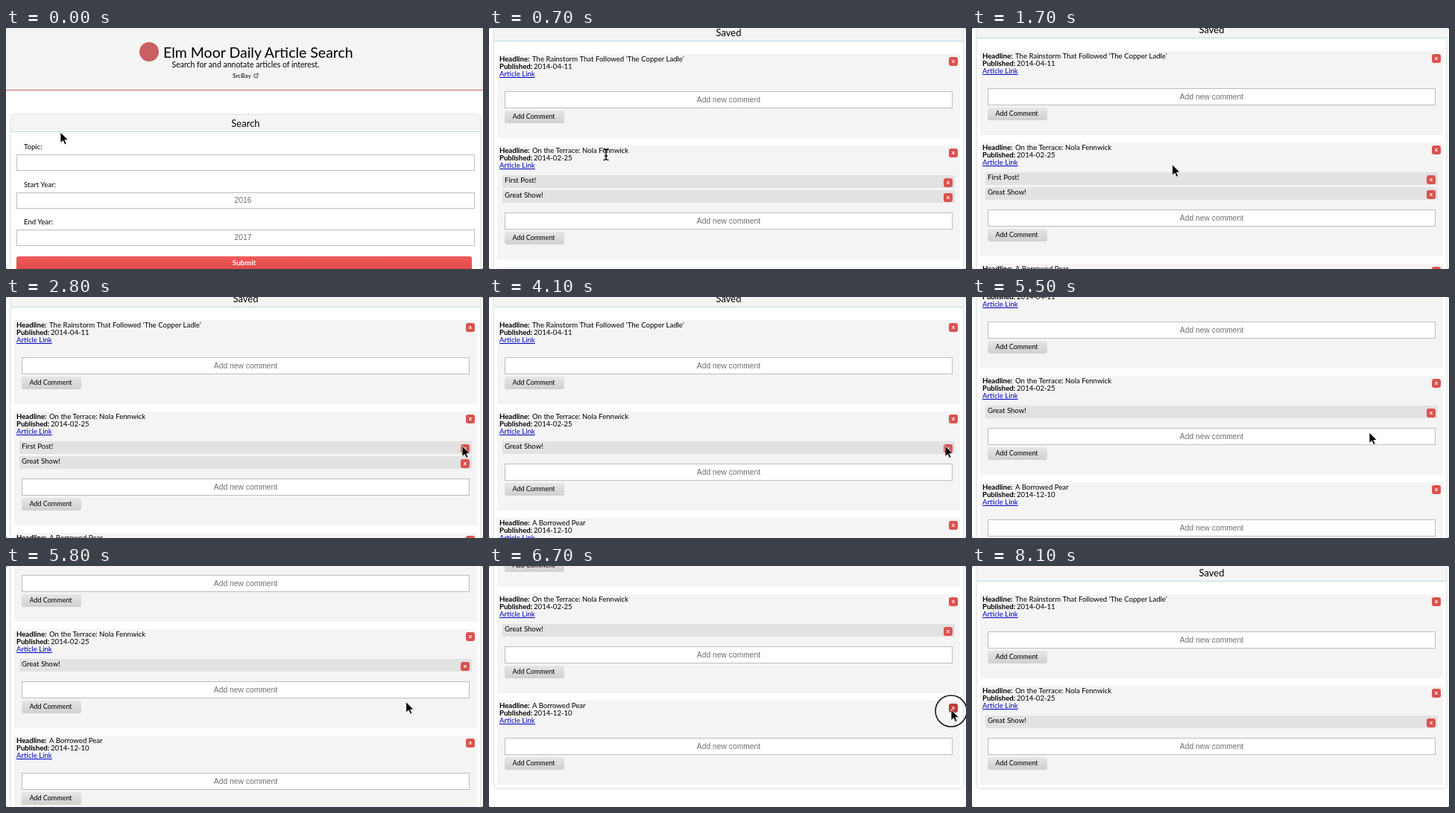
An HTML page that plays this animation: 640x324 px, repeating every 8300 ms.

```html
<!DOCTYPE html>
<html lang="en">
<head>
<meta charset="utf-8">
<title>Article Search</title>
<style>
  * { box-sizing: border-box; }
  html, body { margin: 0; width: 100%; height: 100%; overflow: hidden; background: #666; }
  #stage { position: absolute; inset: 0; overflow: hidden; background: #fff; border-radius: 2px;
    font: 9.6px/10px Lato, "Open Sans", sans-serif; color: #000; }
  #page { position: absolute; left: 0; top: 0; width: 640px; height: 1000px; }
  #page > *, .abs { position: absolute; white-space: nowrap; }

  header { left: 0; top: 0; width: 640px; height: 84px; background: #f4f4f4; border-bottom: 1px solid #cf6666; }
  .badge { left: 179px; top: 19px; width: 26px; height: 26px; border-radius: 50%; background: #c95f60; }
  h1 { margin: 0; left: 211px; top: 21px; font: 19.5px/24px Lato, sans-serif; }
  .lead { left: 0; width: 643px; top: 43px; text-align: center; font-size: 10.5px; line-height: 12px; }
  .repo { left: 304px; top: 59px; font-size: 8.3px; }

  .panel { left: 7px; width: 629px; background: #fff; border-radius: 4px; box-shadow: 0 0 4px rgba(0,0,0,.22); }
  .panel h2 { margin: 0; height: 23px; background: #f4f4f4; border-bottom: 1px solid #b5dfe8;
    border-radius: 4px 4px 0 0; font: 13px/22px Lato, sans-serif; text-align: center; }
  .field { background: #fff; border: 1px solid #bdbdbd; color: #6e6e6e; text-align: center;
    font: 10.3px/21px "Liberation Sans", Arial, sans-serif; height: 23px; }
  .search .field { left: 7px; width: 615px; height: 22px; padding-right: 7px; line-height: 20px; }
  .search label { left: 17px; }
  .submit { left: 7px; top: 190px; width: 611px; height: 19px; border-radius: 3px; color: #fff;
    background: linear-gradient(#f25a5a, #dd4a4a); text-align: center; font: bold 10px/17px Lato, sans-serif; }

  .entry { position: relative; margin: 0 4px 10px; width: 621px; padding: 40px 0 20px; background: #f4f4f4; }
  .entry a { left: 3px; top: 22px; color: #0000c4; text-decoration: underline; }
  .note { position: relative; margin: 0 0 3px 7px; width: 607px; height: 17px; padding-left: 3px;
    background: #e2e2e2; line-height: 14px; }
  .entry .field { margin: 10px 0 3px 10px; width: 601px; }
  .entry .note + .field { margin-top: 13px; }
  .add { margin-left: 10px; width: 80px; height: 17px; padding-right: 2px; border-radius: 3px; text-align: center;
    font-size: 9px; line-height: 16px; background: linear-gradient(#e6e6e6, #d0d0d0); }
  .del { width: 12px; height: 12px; border-radius: 3px; background: #d9534f; color: #fff;
    text-align: center; font: bold 8px/11px "Liberation Sans", Arial, sans-serif; }
  .entry > .del { left: 606px; top: 3.5px; }
  .note > .del { left: 592px; top: 4px; }
  .del.hot { background: #c03a38; }
  svg { position: absolute; left: 0; top: 0; overflow: visible; }
</style>
</head>
<body>
<div id="stage">
  <div id="page">
    <header>
      <div class="abs badge"></div>
      <h1 class="abs">Elm Moor Daily Article Search</h1>
      <div class="abs lead">Search for and annotate articles of interest.</div>
      <div class="abs repo">SrcBay</div>
      <svg width="640" height="84" fill="none" stroke="#333" stroke-width=".8">
        <path d="M335.5 62H333v4.500h4.500V64M335 64.500L338 61.500M336 61.200h2.300v2.300"/>
      </svg>
    </header>
    <section class="panel search" style="top:117px;height:220px">
      <h2>Search</h2>
      <label class="abs" style="top:38px">Topic:</label>
      <div class="abs field" style="top:53px"></div>
      <label class="abs" style="top:89px">Start Year:</label>
      <div class="abs field" style="top:104px">2016</div>
      <label class="abs" style="top:139px">End Year:</label>
      <div class="abs field" style="top:154px">2017</div>
      <div class="abs submit">Submit</div>
    </section>
    <section class="panel" id="saved" style="top:373px;padding-bottom:4px">
      <h2 style="margin-bottom:17px">Saved</h2>
    </section>
  </div>
  <svg width="640" height="324">
    <circle id="ring" r="21" fill="none" stroke="#111" stroke-width="1.5"/>
    <g id="pointer">
      <path id="arrow" d="M0 0V14.500L3.400 11.400L5.800 16.600L8.100 15.600L5.800 10.500H10.300Z" stroke="#fff" stroke-width=".8"/>
      <path id="beam" d="M-3.500 -7.500Q0 -7.500 0 -5Q0 -7.500 3.500 -7.500M0 -5V5.500M-3.500 7.500Q0 7.500 0 5Q0 7.500 3.500 7.500M-2 2H2"
        fill="none" stroke="#000" stroke-width="1.3"/>
    </g>
  </svg>
</div>
<script>
const LOOP = 8300, STEP = 100;
const $ = id => document.getElementById(id);

const articles = [
  ['The Rainstorm That Followed ‘The Copper Ladle’', '2014-04-11', []],
  ['On the Terrace: Nola Fennwick', '2014-02-25', ['First Post!', 'Great Show!']],
  ['A Borrowed Pear', '2014-12-10', []]
];
const del = '<div class="abs del">x</div>';
const line = (top, label, x, text) =>
  `<b class="abs" style="left:3px;top:${top}px">${label}:</b>` +
  `<span class="abs" style="left:${x}px;top:${top}px">${text}</span>`;

articles.forEach(([title, date, notes], i) => {
  const last = i === articles.length - 1;
  $('saved').insertAdjacentHTML('beforeend',
    `<div class="entry"${last ? ' style="margin-bottom:0"' : ''}>` +
    line(2, 'Headline', 47, title) + line(12, 'Published', 49, date) +
    '<a class="abs">Article Link</a>' + del +
    notes.map(n => `<div class="note">${n}${del}</div>`).join('') +
    '<div class="field">Add new comment</div><div class="add">Add Comment</div></div>');
});
const entries = document.querySelectorAll('.entry');
const firstNote = document.querySelector('.note');
const lastEntry = entries[2];
const lastDel = lastEntry.querySelector('.del');

// time, scroll offset
const scroll = [[0, 0], [300, 190], [500, 345], [600, 369], [700, 378], [900, 382],
  [5100, 382], [5300, 412], [5500, 430], [5600, 430], [6000, 472], [6300, 498], [6999, 498], [7000, 375]];
// time, pointer x, pointer y
const path = [[0, 73, 140], [600, 157, 170], [900, 157, 170], [1100, 158, 175], [1400, 158, 175],
  [2300, 585, 208], [2600, 612, 200], [4200, 612, 200], [5100, 533, 182], [5700, 533, 182],
  [6500, 620, 193], [7400, 620, 193], [8100, 575, 340]];

const smooth = p => p * p * (3 - 2 * p);
const linear = p => p;
function at(keys, t, ease) {
  const i = keys.findIndex(k => k[0] > t);
  if (i < 0) return keys[keys.length - 1].slice(1);
  const a = keys[i - 1], b = keys[i];
  const p = ease((t - a[0]) / (b[0] - a[0]));
  return a.slice(1).map((v, j) => v + (b[j + 1] - v) * p);
}
const within = (t, a, b) => t >= a && t < b;
const show = (el, on) => { el.style.display = on ? '' : 'none'; };

function draw(now) {
  const t = Math.floor(now % LOOP / STEP) * STEP;
  const [y] = at(scroll, t, linear);
  const [px, py] = at(path, t, smooth);
  const text = within(t, 500, 1600);
  const gone = t >= 7000;

  $('page').style.transform = `translateY(${-Math.round(y)}px)`;
  show(firstNote, t < 3600);
  show(lastEntry, !gone);
  entries[1].style.marginBottom = gone ? '0' : '';
  lastDel.classList.toggle('hot', within(t, 6500, 7000));

  $('pointer').setAttribute('transform', `translate(${px} ${py})`);
  show($('arrow'), !text);
  show($('beam'), text);
  show($('ring'), within(t, 3400, 3700) || within(t, 6600, 6900));
  $('ring').setAttribute('cx', px);
  $('ring').setAttribute('cy', py + 2);
}

const start = performance.now();
function tick() {
  draw(performance.now() - start);
  requestAnimationFrame(tick);
}
tick();
</script>
</body>
</html>
```
